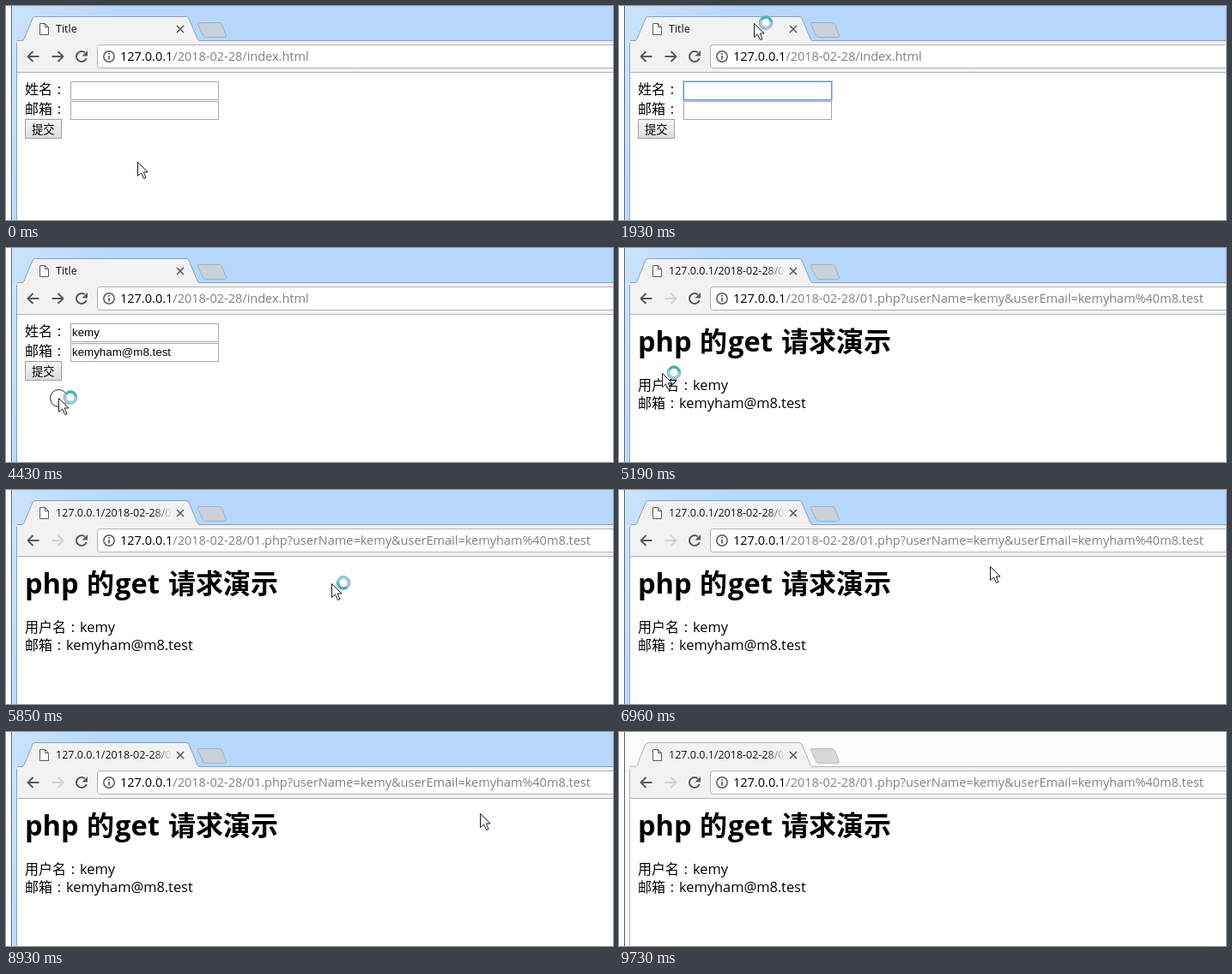
Animation, 707 px wide and 250 px high, one loop 9.83 s. Source, as an HTML page with a canvas:

```html
<!DOCTYPE html>
<html lang="zh-CN">
<head>
<meta charset="utf-8">
<title>Form demo</title>
<style>
html, body { margin: 0; width: 100%; height: 100%; overflow: hidden; background: #fff; }
canvas { display: block; }
</style>
</head>
<body>
<canvas id="stage" width="707" height="250"></canvas>
<script>
const ctx = document.getElementById('stage').getContext('2d');
const LOOP = 9830, TICK = 40;
const UI = '"Open Sans", "Noto Sans", sans-serif';
const CJK = '"Noto Sans CJK SC", "Noto Sans CJK", "Noto Sans CJK JP", sans-serif';
const ARIAL = '"Liberation Sans", Arial, sans-serif';
const ICON = '#5a5a5a';
const NAME = 'kemy', EMAIL = 'kemyham@m8.test';

// Key moments in ms
const FOCUS = 1420, NAMING = 2200, NAMED = 2500, NEXT = 2720, MAILING = 3240;
const MAILED = 3530, LEAVE = 3780, BLUR = 4380, PRESS = 5020, LOADED = 5190, DIM = 9700;

// Pointer moves: from, to, x, y, downward bow
const MOVES = [
  [740, 1150, 140, 95],
  [1500, 1930, 157, 20],
  [MAILING, 3390, 157, 14],
  [LEAVE, 4430, 61, 175],
  [4500, 4710, 50, 146],
  [5350, 5850, 377, 111, 32],
  [5850, 6290, 402, 85],
  [6410, 6700, 335, 117],
  [6700, 7370, 568, 50],
  [7430, 8070, 535, 59, 46],
  [8070, 8410, 473, 57],
  [8460, 8750, 510, 74],
  [8930, 9100, 687, 165]
];

const within = (t, a, b) => t >= a && t < b;

function pointer(t) {
  let x = 153, y = 182, turn = 0;
  for (const [from, to, endX, endY, bow = 0] of MOVES) {
    if (t < from) break;
    const stepped = (Math.floor((t - from) / TICK) + 1) * TICK;
    const p = Math.min(1, stepped / (to - from));
    x += (endX - x) * p;
    y += (endY - y) * p + bow * Math.sin(Math.PI * p);
    turn = p * 10;
  }
  return { x: Math.round(x), y: Math.round(y), turn };
}

// Part of the text typed so far, arriving in equal bursts
function typed(s, t, from, to, bursts) {
  if (t < from) return '';
  const done = Math.floor((t - from) / (to - from) * (bursts - 1) + 1e-6) + 1;
  return s.slice(0, Math.round(s.length * done / bursts));
}

function mix(a, b, k) {
  const channel = i => parseInt(a.substr(i, 2), 16) * (1 - k) + parseInt(b.substr(i, 2), 16) * k;
  return 'rgb(' + [1, 3, 5].map(i => Math.round(channel(i))) + ')';
}

function gradient(x0, y0, x1, y1, from, to) {
  const g = ctx.createLinearGradient(x0, y0, x1, y1);
  g.addColorStop(0, from);
  g.addColorStop(1, to);
  return g;
}

function text(s, x, y, font, color = '#000', align = 'left') {
  ctx.font = font;
  ctx.fillStyle = color;
  ctx.textAlign = align;
  ctx.fillText(s, x, y);
}

function rect(x, y, w, h, fill) {
  ctx.fillStyle = fill;
  ctx.fillRect(x, y, w, h);
}

function box(x, y, w, h, fill, border) {
  rect(x, y, w, h, fill);
  ctx.strokeStyle = border;
  ctx.lineWidth = 1;
  ctx.strokeRect(x + .5, y + .5, w - 1, h - 1);
}

function shape(d, x, y, fill, stroke, width = 1) {
  const p = new Path2D(d);
  ctx.save();
  ctx.translate(x, y);
  ctx.lineJoin = 'round';
  if (fill) { ctx.fillStyle = fill; ctx.fill(p); }
  if (stroke) { ctx.strokeStyle = stroke; ctx.lineWidth = width; ctx.stroke(p); }
  ctx.restore();
}

function arc(x, y, r, color, width = 1, a = 0, b = Math.PI * 2) {
  ctx.beginPath();
  ctx.arc(x, y, r, a, b);
  ctx.strokeStyle = color;
  ctx.lineWidth = width;
  ctx.stroke();
}

function navArrow(x, dir, color) {
  ctx.save();
  ctx.translate(x, 59);
  ctx.scale(dir, 1);
  shape('M-6.5 0H6M.5 -6L6.5 0L.5 6', 0, 0, null, color, 2);
  ctx.restore();
}

function windowFrame(fade) {
  const edge = mix('#8aa3be', '#b2b2b2', fade);
  const sky = gradient(0, 0, 100, 60, mix('#cde4fc', '#fcfcfc', fade), mix('#b5d8fc', '#fcfcfc', fade));
  rect(0, 0, 707, 250, sky);
  rect(7, 40, 5, 210, gradient(0, 40, 0, 250, mix('#cde4fc', '#fcfcfc', fade), mix('#b5d8fc', '#fcfcfc', fade)));
  rect(0, 0, 6, 250, '#fdfdfd');
  rect(6, 0, 1, 250, mix('#4b627e', '#5f5f5f', fade));
  rect(7, 0, 1, 250, mix('#e2f0fe', '#ffffff', fade));
  rect(12, 43, 1, 207, edge);
  rect(13, 41, 694, 37, '#f2f2f2');
  rect(13, 40, 694, 1, edge);
  shape('M2 0H26Q28 0 29 2L34 15Q34 17 32 17H10Q8 17 7 15L1 2Q0 0 2 0Z', 222.5, 19.5,
    mix('#c9d1da', '#d7d7d7', fade), mix('#a0b2c4', '#bebebe', fade));
  shape('M0 28Q2 28 3 26L13 2Q14 0 16 0H192Q194 0 195 2L205 26Q206 28 208 28', 18, 12.5, '#f2f2f2', edge);
  rect(20, 40, 204, 2, '#f2f2f2');
  rect(13, 78, 694, 172, '#fff');
  rect(13, 77, 694, 1, mix('#a5b4c4', '#b6b6b6', fade));
}

function toolbar(result) {
  const host = '127.0.0.1', folder = '/2018-02-28/';
  const query = '01.php?userName=' + NAME + '&userEmail=' + EMAIL.replace('@', '%40');

  shape('M0 0H6L10 4V13H0ZM6 0V4H10', 39.5, 20.5, '#fff', ICON);
  const ink = result ? gradient(172, 0, 193, 0, '#111', 'rgba(17,17,17,0)') : '#111';
  text(result ? host + folder + '01' : 'Title', 58, 31, '12.5px ' + UI, ink);
  shape('M-4 -4L4 4M4 -4L-4 4', 203, 27, null, ICON, 1.6);

  navArrow(32, -1, ICON);
  navArrow(60, 1, result ? '#d3d3d3' : ICON);
  arc(88, 59, 6, ICON, 2, .35, 5.4);
  shape('M0 0V6.5H-6.5Z', 95, 52, ICON);

  ctx.beginPath();
  ctx.roundRect(106.5, 45.5, 620, 27, 3);
  ctx.fillStyle = '#fff';
  ctx.fill();
  ctx.strokeStyle = '#b2b2b2';
  ctx.lineWidth = 1;
  ctx.stroke();
  arc(120, 59, 6.2, ICON, 1.5);
  shape('M0 -4V-2.2M0 -1V3.5', 120, 59, null, ICON, 1.7);

  const font = '14.5px ' + UI;
  text(host, 133, 64, font);
  text(folder + (result ? query : 'index.html'), 133 + ctx.measureText(host).width, 64, font, '#808080');
}

function label(s, x, y) {
  text(s, x, y, '16px ' + CJK);
  text(':', x + s.length * 16 + 8, y, '16px ' + UI, '#000', 'center');
}

function field(y, value, focus) {
  if (focus) box(74, y - 1, 175, 24, '#fff', '#b4cdf2');
  box(75, y, 173, 22, '#fff', focus ? '#5f93dd' : '#a9a9a9');
  text(value, 77, y + 15, '13.333px ' + ARIAL);
}

function menu(y, rows) {
  box(74, y, 176, rows.length * 24 + 2, '#fff', '#d2d2d2');
  rows.forEach((s, i) => text(s, 83, y + 18 + i * 24, 'bold 12px ' + UI));
}

function form(t) {
  label('姓名', 22, 103);
  label('邮箱', 22, 126);
  field(88, typed(NAME, t, NAMING, 2350, 4), within(t, FOCUS, NEXT));
  field(111, typed(EMAIL, t, MAILING, MAILED, 4), within(t, NEXT, BLUR));
  if (within(t, MAILED, LEAVE)) rect(Math.round(77 + ctx.measureText(EMAIL).width), 114, 1, 15, '#000');

  const pressed = t >= PRESS;
  const shade = gradient(0, 132, 0, 155, pressed ? '#dcdcdc' : '#f6f6f6', pressed ? '#ececec' : '#dcdcdc');
  box(22, 132, 43, 23, shade, '#a0a0a0');
  text('提交', 30, 149, '13.333px ' + CJK);

  if (within(t, NAMING, NAMED)) menu(110, [NAME, EMAIL.slice(0, 7), EMAIL]);
  if (within(t, MAILED, LEAVE)) menu(132, [EMAIL]);
}

function answer() {
  const latin = 'bold 32.6px ' + UI, han = 'bold 32px ' + CJK;
  text('php', 22, 121, latin);
  text('的', 94, 121, han);
  text('get', 127, 121, latin);
  text('请求演示', 189, 121, han);
  label('用户名', 22, 166);
  text(NAME, 86, 166, '16.4px ' + UI);
  label('邮箱', 22, 187);
  text(EMAIL, 70, 187, '16.4px ' + UI);
}

function busyRing(x, y, turn) {
  ctx.beginPath();
  ctx.arc(x, y, 8, 0, 7);
  ctx.fillStyle = '#fff';
  ctx.fill();
  arc(x, y, 6.4, '#a5cfdd', 3);
  arc(x, y, 6.4, '#3fb8ae', 2.6, turn, turn + 2.4);
  arc(x, y, 7.8, '#5f9fb9', .8);
  arc(x, y, 4.8, '#7fb0c4', .6);
}

function cursor(t) {
  const { x, y, turn } = pointer(t);
  const overBar = x > 112 && within(y, 46, 73);
  const overField = t < LOADED && within(x, 75, 248) && within(y, 88, 133);
  if ([590, FOCUS, BLUR, PRESS].some(c => within(t, c, c + 130))) arc(x + .5, y + .5, 10, '#222');
  if (overBar || overField) {
    shape('M-3 -7.5H0M1 -7.5H4M.5 -7V7M-3 7.5H0M1 7.5H4', x, y, null, '#000');
    return;
  }
  shape('M0 0V16L4 12.5L7 19L9.5 18L6.7 11.5H11.5Z', x + .5, y + .5, '#fff', '#1c1c2c');
  if (within(t, 1780, 6410)) busyRing(x + 14, y - .5, turn);
}

function draw(t) {
  const result = t >= LOADED;
  windowFrame(t < DIM ? 0 : t < DIM + 30 ? .5 : 1);
  toolbar(result);
  if (result) answer(); else form(t);
  if (t < DIM) cursor(t);
}

const start = performance.now();
function tick() {
  draw((performance.now() - start) % LOOP);
  requestAnimationFrame(tick);
}
tick();
</script>
</body>
</html>
```
